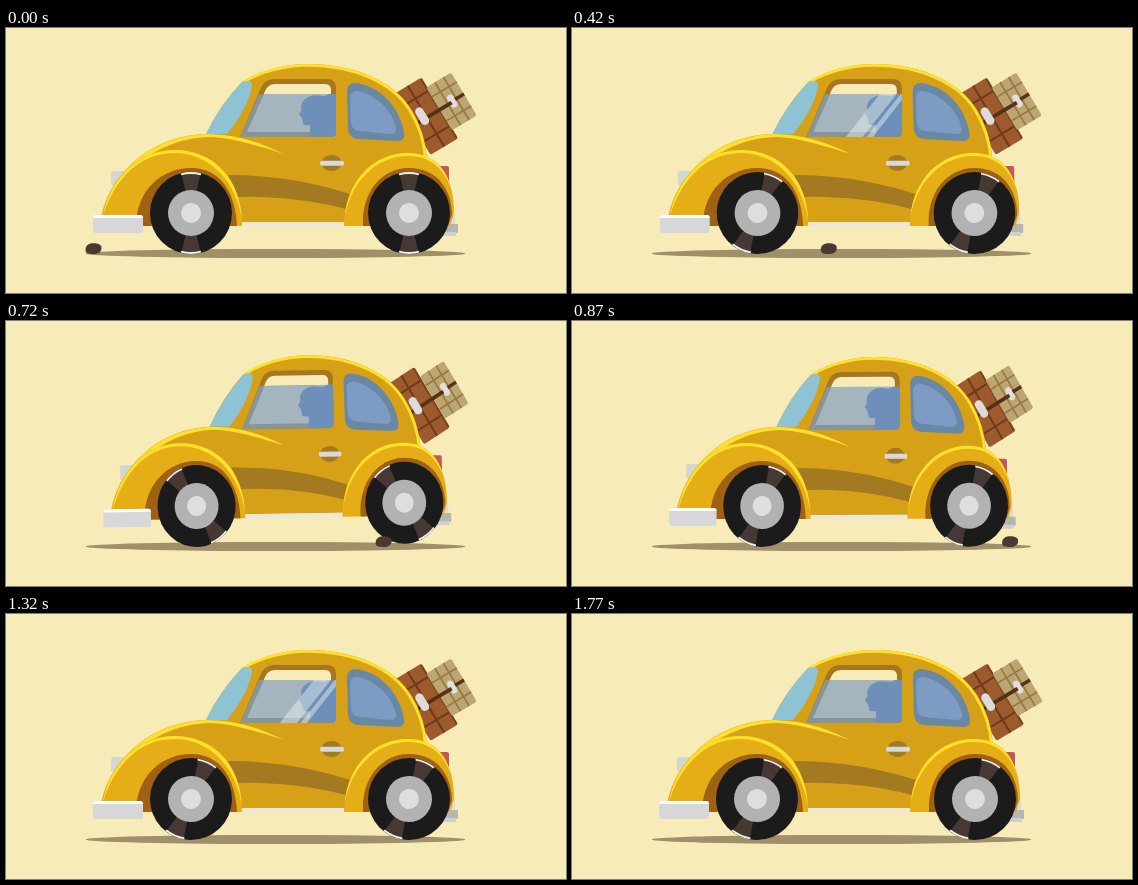
Recreate the animation shown at these times as an HTML page. Size 560 by 265 pixels, loop 1.8 s.

```html
<!DOCTYPE html>
<html lang="en">
<head>
<meta charset="utf-8">
<title>Little yellow car</title>
<style>
  html, body { margin: 0; width: 100%; height: 100%; overflow: hidden; background: #f7ebb8; }
  svg { display: block; width: 560px; height: 265px; }
</style>
</head>
<body>
<svg viewBox="0 0 560 265">
  <defs>
    <clipPath id="panes">
      <path d="M253 66H330V104Q330 109 325 109H234Z"/>
      <path d="M341 64Q341 55 349 55C373 57 394 79 398 105Q399 113 391 113L352 111Q343 110 342 101Z"/>
    </clipPath>
    <g id="tread">
      <path d="M-5.5 -22L-9.5 -39Q0 -41.5 9.5 -39L5.5 -22Z" fill="#463934"/>
      <path d="M-10 -38.7Q0 -41.3 10 -38.7" fill="none" stroke="#f1f1f1" stroke-width="1.8"/>
    </g>
    <g id="wheel">
      <circle r="41" fill="#1b1b1b"/>
      <use href="#tread"/>
      <use href="#tread" transform="rotate(180)"/>
      <circle r="23" fill="#b2b2b2"/>
      <circle r="10" fill="#dedede"/>
    </g>
  </defs>

  <ellipse cx="269.5" cy="225.5" rx="190" ry="4.5" fill="#a09069"/>

  <g id="car">
    <!-- luggage -->
    <g transform="translate(388 66) rotate(-31)">
      <rect width="32" height="71" rx="2" fill="#9d5a2c"/>
      <path d="M0 15H32M0 56H32M16 0V71" stroke="#6f3a19" stroke-width="2" fill="none"/>
      <path d="M31 1V70" stroke="#7b421d" stroke-width="2"/>
      <g id="tanCase">
        <rect x="31" y="11" width="29" height="50" rx="2" fill="#bca673"/>
        <path d="M31 22H60M31 50H60M41 11V61M51 11V61" stroke="#96793f" stroke-width="1.7" fill="none"/>
        <path d="M45 36H60" stroke="#573117" stroke-width="3.5"/>
        <rect x="43" y="29" width="6.5" height="14" rx="3.2" fill="#e0dfdd"/>
      </g>
      <path d="M0 37H45" stroke="#573117" stroke-width="3.8"/>
      <rect x="8.5" y="24" width="8.5" height="19" rx="4.2" fill="#dddcda"/>
    </g>

    <!-- lamps and rear bumper -->
    <rect x="105" y="143" width="16" height="15" rx="3" fill="#d3d7cf"/>
    <rect x="430" y="138" width="13" height="20" rx="2" fill="#c4575b"/>
    <rect x="436" y="185" width="13" height="13" rx="1" fill="#dadada"/>
    <rect x="432" y="196" width="20" height="9" rx="1" fill="#b5b5b2"/>
    <rect x="434" y="204" width="16" height="4" rx="1" fill="#cfcfcd"/>

    <!-- shell -->
    <path d="M97 188C103 150 140 108 200 106Q214 77 236 54C255 42 280 36 302 36C350 36 388 54 405 81C415 97 420 113 421 132V194H130Z" fill="#d6a017"/>
    <path d="M236 55C255 43 280 37.4 302 37.4C349 37.6 387 55 403.6 82C413 97 418.5 113 419.5 132" fill="none" stroke="#ffe02b" stroke-width="2.8"/>
    <path d="M236 194H340V198H236Z" fill="#ebe7de"/>
    <path d="M222 147Q285 147 344 166V182Q290 167 230 169Z" fill="#a37a21"/>
    <path d="M97 188C103 150 140 108 202 106C235 107 255 115 278 126C250 117 226 110 205 109C146 110 108 152 97 188Z" fill="#ffe02b"/>

    <!-- windows -->
    <path d="M200 106Q214 77 236 54Q246 51 246 57Q243 79 221 106Z" fill="#8dc3d2"/>
    <path d="M234 109L254 62Q258 51 268 51H321Q330 51 330 60V104Q330 109 325 109Z" fill="#a67720"/>
    <path d="M241 104L259 63Q262 56 269 56H319Q325 56 325 62V104Z" fill="#f7ebb8"/>
    <path d="M253 66H330V104Q330 109 325 109H234Z" fill="#87959a"/>
    <path d="M258 66H325V104H241Z" fill="#a4b5be"/>
    <path d="M304 109V97Q297 98 297 95L296 90L293 86L295.5 82Q294 75 299 71Q305 66 314 67.5Q320 69 323 66H330V104Q330 109 325 109Z" fill="#6d8fb9"/>
    <path d="M341 64Q341 55 349 55C373 57 394 79 398 105Q399 113 391 113L352 111Q343 110 342 101Z" fill="#6888a5"/>
    <path d="M344 70Q344 62 352 63C371 67 387 84 390 100Q391 106 384 106L353 103Q346 102 345 95Z" fill="#7d9bc3"/>
    <g clip-path="url(#panes)">
      <g id="glint" fill="#eef3f2" fill-opacity=".45">
        <path d="M0 112H17L63 54H46Z"/>
        <path d="M21 112H27L73 54H67Z"/>
      </g>
    </g>

    <!-- door handle -->
    <ellipse cx="325.5" cy="135" rx="10" ry="8" fill="#a37a21"/>
    <rect x="314" y="132.8" width="24" height="5" rx="2" fill="#d9d9d9"/>

    <!-- fenders -->
    <path d="M95 190C100 160 125 122 168 122C210 122 236 152 236 198H110Z" fill="#e5ae17"/>
    <path d="M97 188C101 160 126 122 168 122C208 122 234 151 236 192C230 153 204 125 168 125C129 125 106 158 97 188Z" fill="#ffe02b"/>
    <path d="M130 198C130 163 155 140 185 140C213 140 229 162 231 198Z" fill="#9f6114"/>
    <path d="M338 198C338 156 365 125 402 125C434 125 448 150 448 185L444 198Z" fill="#e5ae17"/>
    <path d="M339 188C342 153 367 125 402 125C427 125 441 141 445 161C438 141 425 128 402 128C369 128 345 155 339 188Z" fill="#ffe02b"/>
    <path d="M357 198C355 164 376 140 403 140C432 140 446 163 446 187L442 198Z" fill="#9f6114"/>

    <use id="front" href="#wheel"/>
    <use id="rear" href="#wheel"/>

    <rect x="87" y="187" width="50" height="18" rx="3" fill="#d7d7da"/>
    <path d="M87 190Q87 187 90 187H134Q137 187 137 190Z" fill="#fff"/>
  </g>

  <path id="stone" d="M-8 1C-8 -4 -4 -5.5 0 -5.5C5 -5.5 8 -4 8 -1C8 3 5 5.3 0 5.3C-5 5.3 -8 4.5 -8 1Z" fill="#4b3831"/>
</svg>

<script>
  const LOOP = 1800, STEP = 30;
  const el = id => document.getElementById(id);
  const place = (id, transform) => el(id).setAttribute("transform", transform);

  // Smooth hill, 1 at the peak and 0 beyond the half width.
  const hill = (t, peak, half) => {
    const d = Math.abs(t - peak) / half;
    return d < 1 ? (1 + Math.cos(Math.PI * d)) / 2 : 0;
  };

  function draw(t) {
    const frontBump = hill(t, 252, 105);
    const rearBump = hill(t, 780, 100);
    const squeeze = 1 - 0.052 * hill(t, 820, 500);

    place("car", `translate(285 0) scale(${squeeze} 1) translate(-285 0)
      rotate(${2.5 * frontBump} 403 125) rotate(${-2.5 * rearBump} 185 125)`);
    place("tanCase", `translate(${4 * (frontBump + rearBump)} 0)`);

    const spin = -0.8 * t;
    place("front", `translate(185 185) rotate(${spin})`);
    place("rear", `translate(403 185) rotate(${spin})`);

    // The reflection sweeps the windows twice per loop.
    const sweep = t % (LOOP / 2);
    place("glint", `translate(${95 + 0.42 * sweep} 0)`);

    place("stone", `translate(${87.5 + 0.403 * t} 220.8)`);
    el("stone").setAttribute("visibility", t < 1045 ? "visible" : "hidden");
  }

  function tick(now) {
    draw(Math.floor((now % LOOP) / STEP) * STEP);
    requestAnimationFrame(tick);
  }
  draw(0);
  requestAnimationFrame(tick);
</script>
</body>
</html>
```
